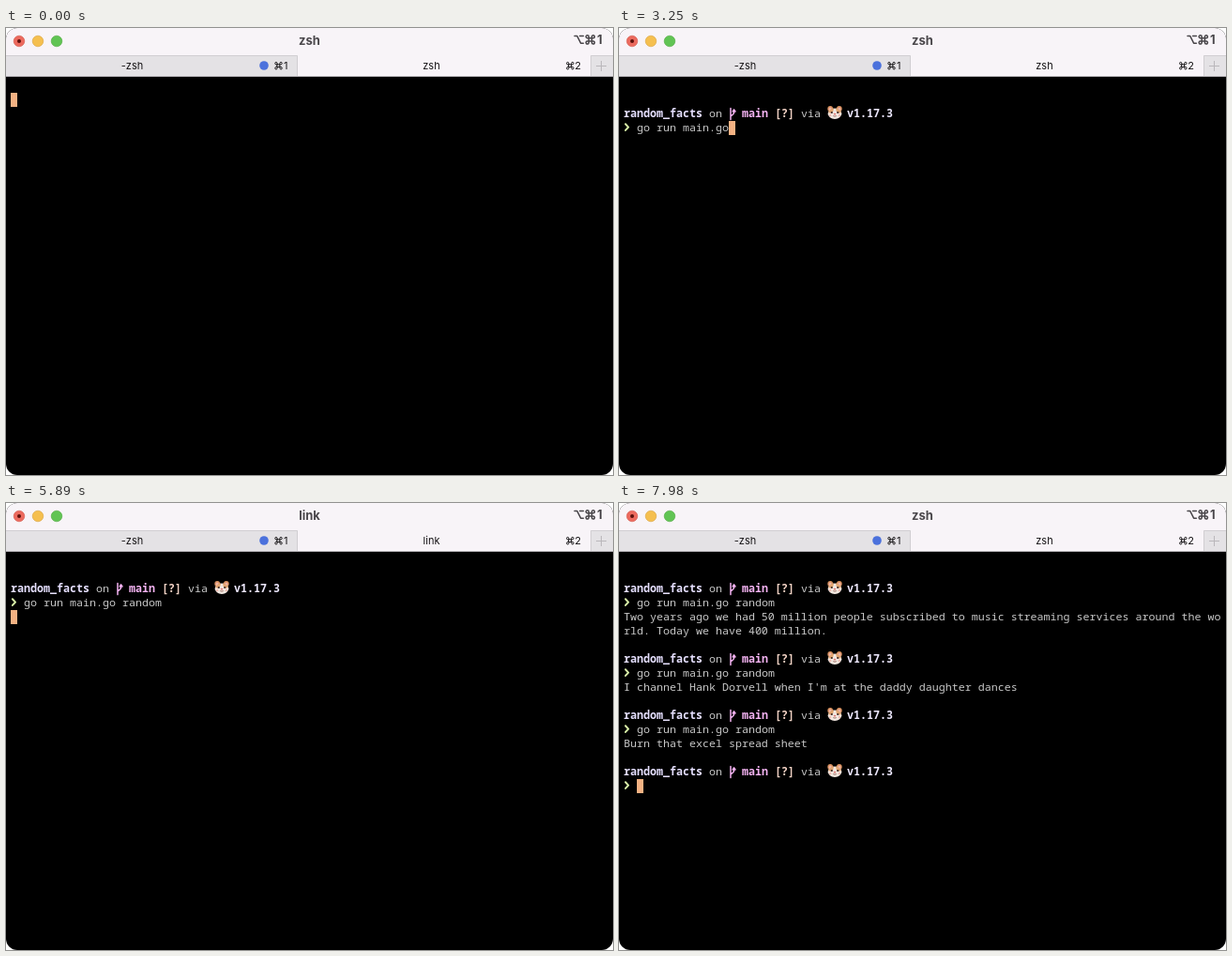
An HTML page that plays this animation: 647 by 476 pixels, repeating every 8 s.

```html
<!DOCTYPE html>
<html lang="en">
<head>
<meta charset="utf-8">
<title>Terminal</title>
<style>
  html, body { margin: 0; width: 100%; height: 100%; overflow: hidden; background: #fff; }
  svg { display: block; }
  text { white-space: pre; }
  .ui { font-family: Inter, "Liberation Sans", sans-serif; }
  .title { font-size: 13px; font-weight: 700; fill: #4a474b; }
  .tab { font-size: 11px; font-weight: 400; fill: #151315; }
  .term { font: 500 11.667px "Noto Sans Mono", "DejaVu Sans Mono", monospace; fill: #c8c8c8; }
  .bold { font-weight: 600; }
  .mid { text-anchor: middle; }
  .dir { fill: #e6e0ff; }
  .branch { fill: #f4b3f2; }
  .status { fill: #f3d3c5; }
  .version { fill: #ebe6fb; }
  .line { fill: none; stroke-linecap: round; stroke-linejoin: round; }
</style>
</head>
<body>
<svg width="647" height="476" viewBox="0 0 647 476">
  <defs>
    <clipPath id="frame"><rect width="647" height="476" rx="12"/></clipPath>
    <path id="cmd" class="line" d="M-1.5-1.5h3v3h-3zM-1.5-1.5h-1.4a1.4 1.4 0 1 1 1.4-1.4zM1.5-1.5v-1.4a1.4 1.4 0 1 1 1.4 1.4zM1.5 1.5h1.4a1.4 1.4 0 1 1-1.4 1.4zM-1.5 1.5v1.4a1.4 1.4 0 1 1-1.4-1.4z"/>
    <g id="hamster">
      <circle cx="3.2" cy="3" r="2.9" fill="#d9925f"/>
      <circle cx="12.8" cy="3" r="2.9" fill="#d9925f"/>
      <circle cx="3.2" cy="3.2" r="1.6" fill="#eeb0a6"/>
      <circle cx="12.8" cy="3.2" r="1.6" fill="#eeb0a6"/>
      <ellipse cx="8" cy="8.2" rx="7.3" ry="5.8" fill="#f2e8e0"/>
      <path d="M1.2 7Q2.5 2.4 7 2.4L6.2 6Q4 8.6 1.2 7zM14.8 7Q13.5 2.4 9 2.4L9.8 6Q12 8.6 14.8 7z" fill="#e0a470"/>
      <circle cx="4.8" cy="7" r="1.1" fill="#3a2420"/>
      <circle cx="11.2" cy="7" r="1.1" fill="#3a2420"/>
      <ellipse cx="8" cy="8.6" rx="1.3" ry=".9" fill="#dd7672"/>
      <path class="line" d="M6.6 10.8Q8 11.6 9.4 10.8" stroke="#8a5348" stroke-width=".8"/>
      <circle cx="3.2" cy="10" r="1.2" fill="#f0beb4"/>
      <circle cx="12.8" cy="10" r="1.2" fill="#f0beb4"/>
    </g>
    <g id="prompt" class="term">
      <text class="bold dir" x="5" y="11">random_facts</text>
      <text x="96" y="11">on</text>
      <path class="line" d="M119 1.5V13.5M122.6 3V6Q122.6 7.6 119 9.8M121.2 5L122.6 3L124 5" stroke="#f4b3f2" stroke-width="1.5"/>
      <text class="bold branch" x="131" y="11">main</text>
      <text class="bold status" x="166" y="11">[?]</text>
      <text x="194" y="11">via</text>
      <use href="#hamster" x="222" y="-1"/>
      <text class="bold version" x="243" y="11">v1.17.3</text>
      <path class="line" d="M6.9 18.3L10 21.6L6.9 24.9" stroke="#d9f2a8" stroke-width="2"/>
    </g>
  </defs>
  <g clip-path="url(#frame)">
    <rect width="647" height="476"/>
    <rect width="647" height="52" fill="#f8f4f8"/>
    <rect y="29" width="311" height="23" fill="#e4e2e5"/>
    <rect x="623" y="29" width="24" height="23" fill="#e4e2e5"/>
    <path d="M0 29.5H310.5V51M647 29.5H623.5V51" fill="none" stroke="#d1ced2"/>
    <path d="M0 51.5H647" stroke="#bbb8bc"/>
    <g stroke-width=".6">
      <circle cx="14" cy="14" r="5.8" fill="#ec6a5e" stroke="#d2564b"/>
      <circle cx="34" cy="14" r="5.8" fill="#f5bf4f" stroke="#d9a23c"/>
      <circle cx="54" cy="14" r="5.8" fill="#61c454" stroke="#4fa840"/>
    </g>
    <circle cx="14" cy="14" r="2" fill="#5c100b"/>
    <circle cx="275" cy="40" r="4.8" fill="#4b71dc"/>
    <path d="M629 40.5H640M634.5 35V46" stroke="#bab7bb"/>
    <g class="ui title">
      <text id="title" class="mid" x="323.5" y="18">zsh</text>
      <path class="line" d="M606 8.6H608.8L612.6 16.2H615.4M611.6 8.6H615.4" stroke="#4a474b" stroke-width="1.5"/>
      <use href="#cmd" transform="translate(622.8 12.4) scale(1.08)" stroke="#4a474b" stroke-width="1.4"/>
      <text x="635.5" y="17" text-anchor="end">1</text>
    </g>
    <g class="ui tab">
      <text class="mid" x="134.5" y="44">-zsh</text>
      <text id="tab" class="mid" x="453.5" y="44">zsh</text>
      <g stroke="#151315" stroke-width="1.1">
        <use href="#cmd" transform="translate(290.5 40.2) scale(.88)"/>
        <use href="#cmd" transform="translate(601.3 40.2) scale(.88)"/>
      </g>
      <text x="300.5" y="44" text-anchor="end">1</text>
      <text x="613" y="44" text-anchor="end">2</text>
    </g>
    <g id="screen"></g>
    <rect id="cursor" width="7" height="15" fill="#f4b283"/>
  </g>
</svg>
<script>
const LOOP = 8000;
const COMMAND = "go run main.go random";
const el = id => document.getElementById(id);
const rowY = row => 54 + row * 15;
const colX = col => 5 + col * 7;

// [time, characters typed]
const typing = [
  [250, 0], [510, 1], [770, 2], [1040, 3], [1310, 5], [1580, 6], [1840, 7],
  [2110, 8], [2370, 10], [2700, 11], [2980, 13], [3250, 14], [3510, 15],
  [3780, 16], [4050, 17], [4310, 18], [4580, 20], [4850, 21]
];
// [time, column, row]
const cursorMoves = [
  [0, 0, 1], ...typing.map(([t, n]) => [t, n + 2, 3]),
  [5120, 0, 4], [5900, 0, 6], [6150, 2, 8], [6410, 23, 8], [6680, 0, 9],
  [6940, 2, 12], [7200, 23, 12], [7460, 0, 13], [7720, 0, 14], [7980, 2, 16]
];
const titles = [[0, "zsh"], [5380, "go"], [5640, "link"], [5900, "zsh"]];

const items = [];
function add(tag, attrs, at, content = "") {
  const node = document.createElementNS("http://www.w3.org/2000/svg", tag);
  for (const key in attrs) node.setAttribute(key, attrs[key]);
  node.textContent = content;
  el("screen").append(node);
  items.push({ node, at });
  return node;
}
const addPrompt = (row, at) => add("use", { href: "#prompt", y: rowY(row) }, at);
const addText = (col, row, at, content) =>
  add("text", { class: "term", x: colX(col), y: rowY(row) + 11 }, at, content);

addPrompt(2, 250);
const typed = addText(2, 3, 250, "");
addText(0, 4, 5900, "Two years ago we had 50 million people subscribed to music streaming services around the wo");
addText(0, 5, 5900, "rld. Today we have 400 million.");
addPrompt(7, 6150);
addText(2, 8, 6410, COMMAND);
addText(0, 9, 6940, "I channel Hank Dorvell when I'm at the daddy daughter dances");
addPrompt(11, 6940);
addText(2, 12, 7200, COMMAND);
addText(0, 13, 7720, "Burn that excel spread sheet");
addPrompt(15, 7980);

const current = (list, t) => list.findLast(step => step[0] <= t) || list[0];

function draw(t) {
  for (const { node, at } of items) node.style.display = t >= at ? "" : "none";
  typed.textContent = COMMAND.slice(0, current(typing, t)[1]);
  const [, col, row] = current(cursorMoves, t);
  el("cursor").setAttribute("x", colX(col));
  el("cursor").setAttribute("y", rowY(row));
  el("title").textContent = el("tab").textContent = current(titles, t)[1];
}

let start;
function tick(now) {
  start ??= now;
  draw((now - start) % LOOP);
  requestAnimationFrame(tick);
}
draw(0);
requestAnimationFrame(tick);
</script>
</body>
</html>
```
